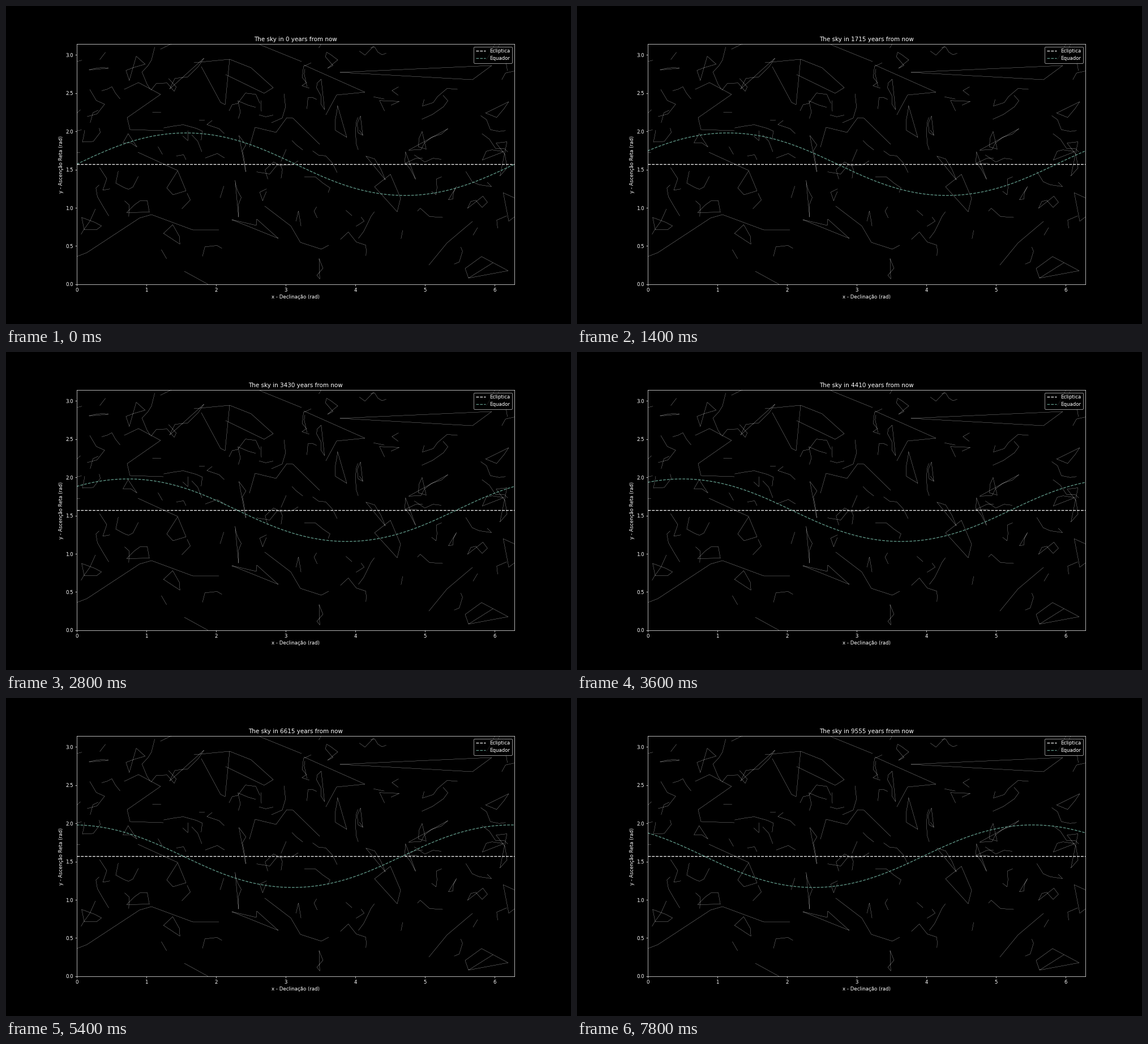
These frames come from a looping animation (998x561 px, 8000 ms). A matplotlib script:

```python
import numpy as np
import matplotlib.pyplot as plt
from matplotlib.animation import FuncAnimation

W, H, DPI = 998, 561, 62.375
FRAMES, STEP_MS = 40, 200
YEARS_PER_FRAME = 245
PRECESSION_YEARS = 25772
TILT = np.radians(23.44)
LEFT, RIGHT, BOTTOM, TOP = 0.125, 0.9, 0.125, 0.88
CELL = 35

plt.style.use("dark_background")
plt.rcParams.update({"font.family": "DejaVu Sans", "font.size": 10})

fig, ax = plt.subplots(figsize=(W / DPI, H / DPI), dpi=DPI)
fig.subplots_adjust(left=LEFT, right=RIGHT, bottom=BOTTOM, top=TOP)
ax.set_xlim(0, 2 * np.pi)
ax.set_ylim(0, np.pi)
ax.set_xlabel("x - Declinação (rad)")
ax.set_ylabel("y - Ascenção Reta (rad)")
title = ax.set_title("")

# The large constellations, as stage points.
LARGE = [
    [(590, 117), (858, 105), (824, 130), (590, 117)],
    [(860, 453), (817, 480), (811, 463), (840, 442), (887, 467), (817, 480)],
    [(125, 442), (143, 435), (236, 374), (257, 368), (330, 395), (376, 395)],
    [(448, 68), (522, 98)],
    [(526, 104), (634, 152), (584, 157), (565, 192)],
    [(430, 249), (440, 214), (477, 223), (496, 197), (507, 198), (554, 244)],
    [(332, 100), (395, 94), (387, 174), (379, 170), (345, 107)],
    [(395, 94), (433, 109), (472, 144), (456, 154), (388, 121)],
    [(209, 147), (234, 135), (273, 156), (214, 197), (219, 218), (278, 220)],
    [(233, 258), (303, 290), (318, 326), (295, 333), (284, 321), (303, 291)],
    [(457, 353), (503, 388), (520, 417), (557, 429), (570, 422)],
    [(399, 377), (481, 410), (443, 376), (442, 387), (399, 377)],
    [(679, 297), (651, 319), (691, 363), (697, 339), (679, 297)],
    [(747, 457), (779, 418), (824, 380)],
    [(315, 468), (357, 491)],
]


def draw(points):
    px, py = np.array(points).T
    x = (px / W - LEFT) / (RIGHT - LEFT) * 2 * np.pi
    y = (1 - py / H - BOTTOM) / (TOP - BOTTOM) * np.pi
    ax.plot(x, y, color="white", lw=0.3)


def along(points, n=20):
    """Evenly spread points on every segment of a polyline."""
    p = np.array(points, float)
    t = np.linspace(0, 1, n)[:, None]
    return np.vstack([a + t * (b - a) for a, b in zip(p, p[1:])])


def small_figure(rng, start):
    """Short random walk, now and then closed to a loop."""
    n = rng.integers(1, 6)
    heading = rng.uniform(0, 2 * np.pi) + np.cumsum(rng.normal(0, 1.1, n))
    step = rng.uniform(7, 24, n)
    moves = np.column_stack([step * np.cos(heading), step * np.sin(heading)])
    path = np.vstack([start, start + np.cumsum(moves, axis=0)])
    if n > 2 and rng.random() < 0.3:
        path = np.vstack([path, start])
    return path


def draw_sky():
    rng = np.random.default_rng(12)
    taken = np.vstack([along(f) for f in LARGE])
    for figure in LARGE:
        draw(figure)
    for cy in range(85, 470, CELL):
        # the southern sky is nearly empty
        density = 0.68 * min(1, (475 - cy) / 130)
        for cx in range(140, 885, CELL):
            start = np.array([cx, cy]) + rng.uniform(-12, 12, 2)
            path = small_figure(rng, start)
            gap = np.hypot(*(taken - path.mean(axis=0)).T).min()
            if rng.random() < density and gap > 16:
                draw(path)


draw_sky()
lon = np.linspace(0, 2 * np.pi, 500)
ax.plot(lon, np.full_like(lon, np.pi / 2), "--", color="white",
        label="Ecliptica")
equator, = ax.plot(lon, lon, "--", color="#629a8a", label="Equador")
ax.legend(loc="upper right")


def update(i):
    years = i * YEARS_PER_FRAME
    shift = 2 * np.pi * years / PRECESSION_YEARS
    equator.set_ydata(np.pi / 2
                      + np.arctan(np.tan(TILT) * np.sin(lon + shift)))
    title.set_text(f"The sky in {years} years from now")
    return equator, title


anim = FuncAnimation(fig, update, frames=FRAMES, interval=STEP_MS,
                     init_func=lambda: update(0), repeat=True,
                     repeat_delay=0, blit=False)
plt.show()
```
